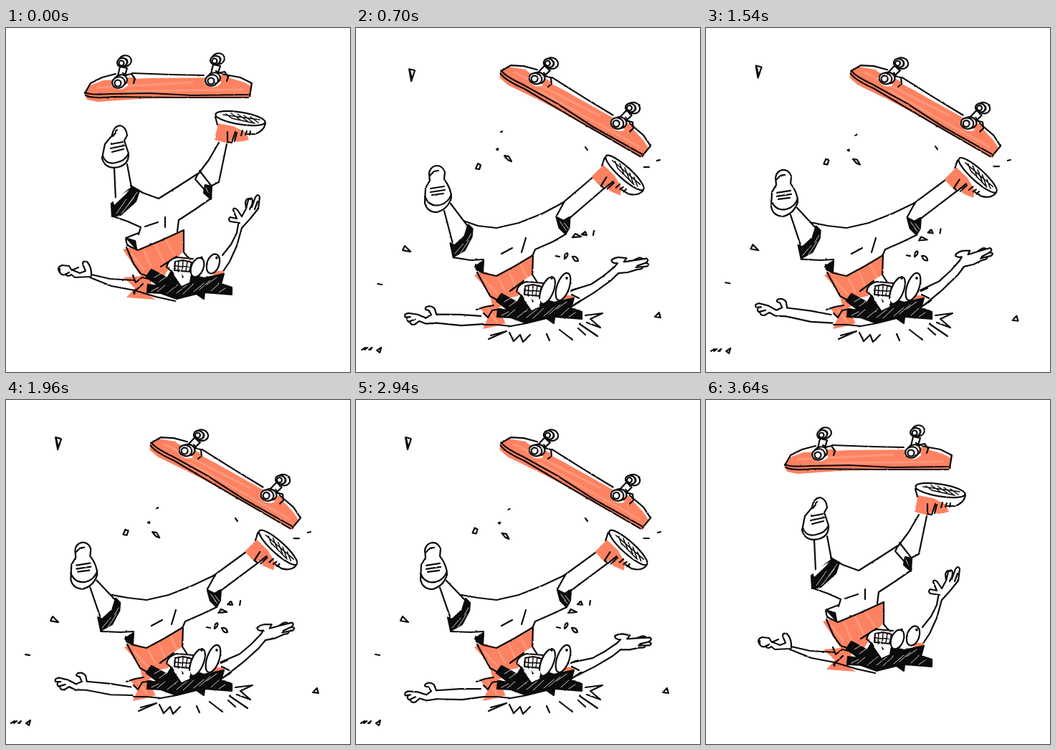
Animation of 480x480 px, one loop 3710 ms. Source, as an HTML page:

```html
<!DOCTYPE html>
<html lang="en">
<head>
<meta charset="utf-8">
<title>Skateboard tumble</title>
<style>
html, body { margin: 0; width: 100%; height: 100%; overflow: hidden; background: #fff; }
svg { display: block; width: 100vw; height: 100vh; }
path, ellipse { fill: none; stroke: #0c0a0a; stroke-width: 2.2; stroke-linecap: round; stroke-linejoin: round; }
.red { fill: #fd8262; stroke: none; }
.streak { stroke: #ffa083; stroke-width: 3; opacity: .7; }
.black { fill: #0c0a0a; }
.white { fill: #fff; }
.blank { fill: #fff; stroke: none; }
.scratch { stroke: #fff; stroke-width: .8; }
.thin { stroke-width: 1.5; }
</style>
</head>
<body>
<svg viewBox="0 0 480 480">
  <defs>
    <filter id="crayon" filterUnits="userSpaceOnUse" x="0" y="0" width="480" height="480" color-interpolation-filters="sRGB">
      <feTurbulence type="fractalNoise" baseFrequency=".2" numOctaves="2" seed="4"/>
      <feDisplacementMap in="SourceGraphic" scale="1.8" xChannelSelector="R" yChannelSelector="G"/>
    </filter>
  </defs>
  <g filter="url(#crayon)">
    <g id="board"></g>
    <g id="air"></g>
    <g id="hit"></g>
  </g>
</svg>
<script>
const $ = id => document.getElementById(id);
const p = (d, cls = '') => `<path class="${cls}" d="${d}"/>`;
const oval = (x, y, rx, ry, turn = 0, cls = 'white') =>
  `<ellipse class="${cls}" rx="${rx}" ry="${ry}" transform="translate(${x} ${y}) rotate(${turn})"/>`;
const group = (id, body, move = '') => `<g id="${id}" transform="${move}">${body}</g>`;
const line = id => `<path id="${id}"/>`;

const wheel = (x, y, r) => oval(x, y, r, r * .85, -15) + oval(x - 1, y + 1, r * .5, r * .5);

// drawn around the lower wheel
const truck = (x, y) => group('',
  p('M-10 4Q-6-14 14-9L13 4Q2 15-10 4Z', 'blank') +
  p('M8-7L21-7L22 1L10 2Z', 'red') +
  p('M9-10L18-12L23-5L21 1') +
  p('M2-22L-1-9L8-7L12-20Z', 'white') + p('M6-13L11-10') +
  wheel(9, -30, 9) + wheel(5, -28, 7) + wheel(3, -3, 9) + wheel(0, 0, 9),
  `translate(${x} ${y})`);

$('board').innerHTML =
  p('M109 91L117 80L136 73L200 70L310 69L330 75L342 81L342 97L250 97L185 99L128 103L113 100Z', 'red') +
  p('M128 83L260 76M170 88L330 86M190 80L230 78', 'streak') +
  p('M110 91L118 77L134 69L153 64M176 63L230 65L276 66M300 64L327 69L343 77L340 95') +
  p('M110 90Q118 94 145 92L200 91L260 94L338 93M111 94Q121 99 150 96L240 97L338 97') +
  truck(157, 76) + truck(287, 73);

// drawn around the middle of the sole
const sneaker =
  p('M-35-2L-32 9L-10 13L8 22L20 22Q33 18 35 7Z', 'white') +
  p('M-31 7L-10 11L8 20L12 30L-4 33L-10 28L-17 35L-36 30Z', 'red') +
  oval(0, 0, 35, 8.5, 9) +
  p('M-20-6L-12 0M-13-7L0 2M-4-6L10 4M5-4L18 6M14-2L25 6M-24-5L27 2M-12 0L20 7', 'thin') +
  p('M-18 19L-18 33L-12 34L-7 19M-5 20L-8 32M1 24L3 17M7 23L9 18M13 23L14 18');

const head = (eyeLength, eyeY) =>
  p('M234 359L242 353L255 355L258 361L236 363ZM289 373L305 373L303 384L290 384Z', 'red') +
  p('M224 368Q226 357 238 354L261 356M232 375L226 369M247 358L259 361L256 374L235 372L236 360Z', 'white') +
  p('M235 366L257 367M241 359L240 373M247 359L246 374M253 360L251 373', 'thin') +
  p('M203 371L225 383L231 373L240 388L241 374L250 386L261 378L276 383L304 377L300 391L315 396L315 406L277 403L276 412L266 405L238 412L216 404L197 403L198 392L213 394L196 381Z', 'black') +
  p('M207 382L217 376M214 388L224 381M203 401L213 396M211 402L222 393M225 404L240 392M238 404L252 393M247 405L262 391M262 402L276 390M270 399L285 386M286 401L297 391M297 403L306 397M280 392L294 382', 'scratch') +
  oval(267, eyeY + 5, 8.5, eyeLength, 22) + oval(289, eyeY, 8.5, eyeLength, 19) +
  oval(273, eyeY - eyeLength * .6, .7, 1, 0, 'black') + oval(294, eyeY - eyeLength * .6, .7, 1, 0, 'black') +
  p('M234 378L244 373L246 383L258 377L256 389L245 394Z', 'blank');

const airShoe =
  p('M148 150Q150 137 159 136Q168 138 169 150L165 157L171 175Q172 190 157 194Q139 198 134 182L138 162Z', 'white') +
  p('M135 178Q139 191 153 188Q166 186 171 175M147 162L163 159M146 168L165 164M148 173L164 169M149 151L153 146M153 144L155 142');

$('air').innerHTML =
  p('M151 195L153 238M169 190L175 222M268 204L283 184L297 160M308 162L297 215L287 220') +
  p('M147 245L176 222L186 227L181 242L160 261L148 263Z', 'black') +
  p('M149 240L153 237L172 226L167 232L151 247Z', 'blank') +
  p('M154 259L168 239M161 259L179 236M171 246L183 229', 'scratch') +
  p('M278 219L287 221L286 239L276 230Z', 'black') +
  p('M279 223L284 234', 'scratch') +
  p('M174 220L191 230L213 238L240 221L268 203L264 211L287 237L264 253L241 268L239 284M270 199L287 221M150 263L170 270L188 278L185 288M222 264L222 278M194 277L212 271') +
  airShoe +
  group('', sneaker, 'translate(327 126)') +
  p('M163 309L173 306L184 310L248 283L249 310L233 327L218 350L205 347L198 372L209 379L168 376L180 363L164 348L188 346Z', 'red') +
  p('M175 315L192 337M193 311L204 337M208 303L220 326M223 297L235 316', 'streak') +
  p('M167 293L185 286M168 293L182 308L180 297L170 294', 'black') +
  p('M167 294L169 303L184 310L215 297L248 282L248 313L255 321M168 306L178 329L188 343L203 348M216 333L238 319M177 345L181 355L190 348L203 351M178 369L191 357M181 365L179 371') +
  p('M119 344L145 350L178 352M117 348L147 360L179 366L209 375L236 381') +
  p('M119 346Q120 334 113 326Q105 324 108 332L111 339L103 342L91 337L88 332L78 331Q70 334 75 341M75 336Q74 346 83 344L88 341M83 344Q87 348 91 344L96 348L118 347M92 338L101 334', 'white') +
  p('M325 269L322 286L314 302L302 317M329 279L322 304L312 326L300 344') +
  p('M326 272L313 270Q309 267 313 264L322 266L317 254Q318 249 323 254L329 263L335 252L338 240Q343 234 344 241L343 250L348 236Q352 230 354 236L352 252L340 267L329 279M335 252L334 243Q336 236 341 239M340 253L345 243M347 253L351 242', 'white') +
  group('', head(14, 363), 'translate(0 -34)');

$('hit').innerHTML =
  line('legs') +
  group('leftHem', p('M128 303L134 306L148 293L153 277L159 283L158 294L148 313L132 322Z', 'black') +
    p('M134 318L146 304M142 317L154 299M151 300L157 290', 'scratch')) +
  group('rightHem', p('M281 265L291 270L300 265L299 280L294 289L285 280Z', 'black') +
    p('M286 271L295 284M292 273L298 281', 'scratch')) +
  line('shorts') +
  group('leftShoe',
    p('M96 210Q97 201 106 199Q115 199 118 208L117 218Q127 231 127 244Q122 260 107 264Q93 264 90 251L91 230L97 220Z', 'white') +
    p('M90 242Q96 257 111 254Q123 251 127 239M98 231L117 228M98 236L118 233M100 240L116 238M97 213L102 208M103 207L109 206')) +
  group('rightShoe', group('', sneaker, 'translate(380 206) rotate(33)')) +
  p('M165 345L177 339L196 347L247 318L248 343L234 352L226 374L208 378L203 388L198 391L209 412L196 416L177 420L184 404L173 391L190 386L185 367Z', 'red') +
  p('M179 351L197 371M199 350L208 367M214 341L222 360M230 331L238 347M184 393L197 410', 'streak') +
  p('M166 333L178 325L177 340Z', 'black') +
  p('M167 330L168 337L178 342L196 346L222 332L247 317L246 344L253 355M169 341L187 374L198 380M215 367L234 353M168 393L180 389L192 387M178 398L184 404L190 394L202 392M178 414L196 414L216 416L238 412') +
  group('leftArm',
    p('M112 405L145 403L174 403M113 417L148 418L178 414') +
    p('M112 405L109 397Q103 392 97 396Q94 400 101 400L105 406L98 411L86 407L73 406Q66 408 69 412L76 411M73 412Q70 415 74 418L83 414M76 418Q77 423 83 421L89 416L98 419L113 417', 'white')) +
  group('rightArm',
    p('M302 366L330 360L348 350L364 339M305 386L333 372L358 357L369 348') +
    p('M364 339L369 334Q361 334 361 329Q365 326 372 326L382 328L378 333L391 332L410 331Q414 334 408 337L396 340M408 337Q415 339 409 342L394 342M404 342Q403 346 396 345L382 348L369 348M391 332L399 329Q404 329 404 331', 'white')) +
  head(20, 361) +
  p('M300 367L309 363M301 372L311 377M302 388L314 380') +
  p('M185 434L210 423L188 429M214 425L220 437L229 428L233 438L243 428M266 427L270 436M284 421L302 435M310 419L320 428M312 413L337 430M322 411L341 418L327 406L344 398L320 401') +
  '<g id="debris"></g>';

// shape, early place, resting place, drift length in drawings
const specks = [
  ['M-4-8L4-6L-1 9ZM-3-6L0 6', 78, 65, 73, 60, 4],
  ['M-3 3L0-4L4-2L2 4Z', 170, 193, 165, 181, 12],
  ['M-1 0L1-1L1 1Z', 197, 169, 200, 172, 12],
  ['M-1 0L1-1', 203, 145, 215, 154, 12],
  ['M-5-4L1-3L5 4L0 2Z', 212, 182, 208, 191, 12],
  ['M-2-2L1 2', 322, 168, 322, 167, 4],
  ['M-4 0L3 0', 406, 194, 406, 193, 4],
  ['M-2 0L2-1', 422, 185, 423, 185, 4],
  ['M-5 2L-2-4L6 4Z', 70, 308, 67, 306, 4],
  ['M-3 0L3 1', 33, 357, 30, 355, 4],
  ['M-4 2L2-4L4 3Z', 421, 401, 432, 406, 3],
  ['M-7 2L-2-1L-3 2L1-1M3 2L7-1L5 2', 15, 447, 14, 449, 4],
  ['M-3 1L3-3L1 4Z', 32, 449, 31, 450, 4],
  ['M-6 2L-2-3L6 1Z', 308, 290, 302, 295, 4],
  ['M-4 1L1-3L3 2Z', 319, 287, 313, 284, 4],
  ['M0-3L-1 3', 332, 286, 327, 283, 4],
  ['M-3 0L2 1', 282, 318, 283, 317, 4],
  ['M-2 4Q-2-4 2-4Q4 0-2 4', 293, 318, 293, 315, 4],
  ['M-4-3Q3-4 4 3Q-1 5-4-3', 306, 322, 305, 321, 4]
];
$('debris').innerHTML = specks.map(s => p(s[0])).join('');

const move = (id, x, y) => $(id).setAttribute('transform', `translate(${x} ${y})`);
const turn = (id, deg, x, y) => $(id).setAttribute('transform', `rotate(${deg} ${x} ${y})`);

function drawHit(n) {
  const lag = Math.min(4, Math.exp((8 - n) / 5));
  const [lx, ly, rx, ry] = [6 * lag, -7 * lag, -5 * lag, -4 * lag];
  const [hx, hy, kx, ky] = [lx * .6, ly * .4, rx * .3, ry * .3];
  move('leftShoe', lx, ly);
  move('rightShoe', rx, ry);
  move('leftHem', hx, hy);
  move('rightHem', kx, ky);
  $('legs').setAttribute('d',
    `M${117 + lx} ${262 + ly}L${131 + hx} ${302 + hy}M${126 + lx} ${252 + ly}L${152 + hx} ${279 + hy}` +
    `M${290 + kx} ${245 + ky}L${337 + rx} ${211 + ry}M${300 + kx} ${266 + ky}L${351 + rx} ${228 + ry}`);
  $('shorts').setAttribute('d',
    `M${147 + hx} ${272 + hy}L170 276L196 279L227 272L260 259L${292 + kx} ${244 + ky}L${281 + kx} ${264 + ky}` +
    `M${294 + kx} ${289 + ky}L275 298L250 309L247 316M${132 + hx} ${323 + hy}L160 324L178 323M237 293L231 313M203 315L218 307`);

  // arms whip up after the blow, then sink under gravity
  const drop = n < 14 ? Math.min(45, 14 * ((14 - n) / 6) ** 2) : .062 * (n - 14) ** 2;
  turn('leftArm', (22 - drop) * .5, 190, 404);
  turn('rightArm', (drop - 22) * .62, 300, 378);

  const burst = 1 - Math.exp(-.9 * n);
  specks.forEach(([, x0, y0, x1, y1, tau], i) => {
    const q = Math.min(2, Math.exp((8 - n) / tau));
    const x = x1 + (x0 - x1) * q, y = y1 + (y0 - y1) * q;
    $('debris').children[i].setAttribute('transform',
      `translate(${255 + (x - 255) * burst} ${390 + (y - 390) * burst})`);
  });
}

let shown = -1;
function render(ms) {
  const tick = Math.floor(ms % 3710 / 70);
  const n = Math.floor(tick * 4 / 5);
  if (n !== shown) {
    shown = n;
    const flying = n === 0 || n >= 40;
    $('air').style.display = flying ? '' : 'none';
    $('hit').style.display = flying ? 'none' : '';
    const fall = flying ? 0 : 1 - Math.exp(-.9 * n);
    $('board').setAttribute('transform',
      `translate(${222 + 86 * fall} ${73.5 + 27.5 * fall}) rotate(${30 * fall}) translate(-222 -73.5)`);
    if (!flying) drawHit(n);
  }
}
const start = performance.now();
function loop() {
  render(performance.now() - start);
  requestAnimationFrame(loop);
}
loop();
</script>
</body>
</html>
```
